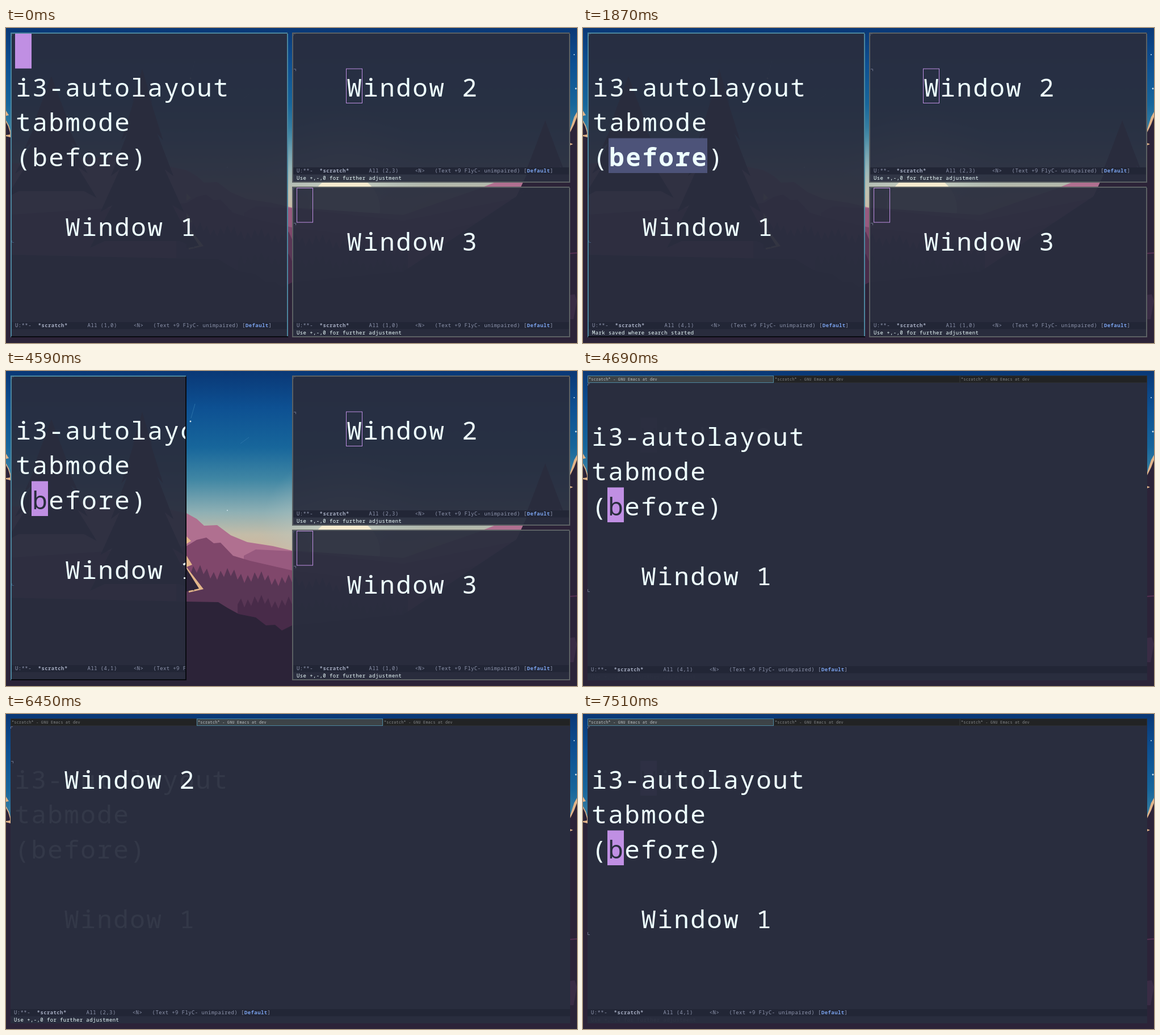
Write an HTML page that moves like this. It is 1006 px wide and 556 px high and loops after 8000 ms.

```html
<!DOCTYPE html>
<html lang="en">
<head>
<meta charset="utf-8">
<title>Tab mode</title>
<style>
  html, body { margin: 0; width: 100%; height: 100%; overflow: hidden; background: #2c2338; }
  svg { display: block; }
  text {
    font-family: "Noto Sans Mono", "DejaVu Sans Mono", monospace;
    letter-spacing: .0488em;
    white-space: pre;
    fill: #eeffff;
  }
  .big { font-size: 44.4px; letter-spacing: .0532em; }
  .small { font-size: 8.94px; }
  .tab { font-size: 6.67px; }
  .bold { font-weight: 700; }
</style>
</head>
<body>
<svg id="stage" width="1006" height="556" viewBox="0 0 1006 556">
  <defs>
    <linearGradient id="sky" x1="0" y1="0" x2="0" y2="320" gradientUnits="userSpaceOnUse">
      <stop offset="0" stop-color="#0a3876"/>
      <stop offset=".2" stop-color="#0d5092"/>
      <stop offset=".42" stop-color="#17669b"/>
      <stop offset=".6" stop-color="#4187a4"/>
      <stop offset=".78" stop-color="#8fb0b4"/>
      <stop offset=".9" stop-color="#c3bca8"/>
      <stop offset="1" stop-color="#d2b69c"/>
    </linearGradient>
    <radialGradient id="glow" cx="597" cy="290" r="150" gradientUnits="userSpaceOnUse">
      <stop offset="0" stop-color="#d8dccb" stop-opacity=".8"/>
      <stop offset="1" stop-color="#a9c3c6" stop-opacity="0"/>
    </radialGradient>
  </defs>
  <g id="wallpaper"></g>
  <g id="desktop"></g>
</svg>
<script>
const LOOP = 8000;
const COL = 29, ROW = 61.5, BASE = 49, BEARING = 1.2;
const BG = '#292d3e', PURPLE = '#c08fe3', DARK = '#2c2338', PEACH = '#e2b58a';
const HINT = 'Use +,-,0 for further adjustment';

const rect = (x, y, w, h, fill, extra = '') =>
  `<rect x="${x}" y="${y}" width="${w}" height="${h}" fill="${fill}" ${extra}/>`;
const poly = (points, fill) => `<polygon points="${points}" fill="${fill}"/>`;
const line = (d, stroke, width = 1) =>
  `<path d="${d}" fill="none" stroke="${stroke}" stroke-width="${width}"/>`;
const esc = s => s.replace(/&/g, '&amp;').replace(/</g, '&lt;');
const text = (x, y, cls, s, fill = '#eeffff') =>
  `<text x="${x}" y="${y}" class="${cls}" style="fill:${fill}">${esc(s)}</text>`;
const big = (x, y, s, bold, fill) =>
  text(x + BEARING, y + BASE, bold ? 'big bold' : 'big', s, fill);

// ---- wallpaper ----
function tree(cx, top, bottom, half) {
  const left = [], right = [];
  for (let i = 1; i <= 5; i++) {
    const y = top + (bottom - top) * i / 5, w = half * i / 5;
    left.unshift(`${cx - w * .72},${y - 12} ${cx - w},${y}`);
    right.push(`${cx + w},${y} ${cx + w * .72},${y - 12}`);
  }
  return poly(`${cx},${top} ${right.join(' ')} ${left.join(' ')}`, DARK);
}

function forest(x0, x1, y0, y1, fill) {
  let pts = `${x0},556 `;
  const n = Math.round((x1 - x0) / 6);
  for (let i = 0; i <= n; i++) {
    const y = y0 + (y1 - y0) * i / n + 5 * Math.sin(i * .7) + (i % 2 ? -7 : 7);
    pts += `${x0 + i * 6},${y} `;
  }
  return poly(pts + `${x1},556`, fill);
}

function wallpaper() {
  const stars = [[325, 89], [390, 246], [1004, 107], [1001, 47]]
    .map(([x, y], i) => `<circle cx="${x}" cy="${y}" r="${i % 2 ? 1 : 1.4}" fill="#cfe4ee"/>`).join('');
  return rect(0, 0, 1006, 556, 'url(#sky)') +
    rect(430, 140, 334, 200, 'url(#glow)') +
    '<circle cx="597" cy="320" r="62" fill="#f6ebcf"/>' +
    stars +
    line('M326 83L333 58M413 128L428 117', '#2f78ad', .8) +
    poly('0,240 200,225 318,251 336,261 349,273 372,272 396,290 425,302 470,309 504,317 700,330 830,285 860,273 930,270 994,245 994,556 0,556', '#b07090') +
    poly('419,326 440,315 504,318 700,340 900,300 900,556 419,556', '#985a7f') +
    poly('0,330 318,309 336,298 353,294 366,304 378,303 400,326 430,335 504,352 700,375 1006,300 1006,556 0,556', '#80476b') +
    forest(300, 708, 350, 392, '#593655') +
    forest(408, 708, 405, 420, '#482b49') +
    poly('0,400 318,407 374,408 390,418 410,429 440,435 458,449 474,448 486,458 504,449 700,430 940,270 1006,240 1006,556 0,556', DARK) +
    poly('318,292 326,300 318,305', PEACH) +
    poly('318,326 328,342 318,346', PEACH) +
    poly('318,346 348,385 322,391', PEACH) +
    poly('318,349 340,384 318,389', DARK) +
    tree(80, 85, 300, 80) + tree(240, 72, 388, 92) + tree(950, 163, 390, 86) +
    poly('0,146 5,154 0,155', PEACH) +
    poly('0,163 5,172 8,182 8,556 0,556', PEACH) +
    poly('0,166 4,174 7,184 7,188 0,189 0,191 8,193 8,556 0,556', DARK) +
    poly('1006,148 1001,157 994,179 994,556 1006,556', PEACH) +
    poly('1006,157 1001,170 994,184 994,203 999,205 994,207 994,556 1006,556', DARK) +
    line('M992 398L1006 397', '#573052', 2) +
    poly('994,471 1002,470 1006,482 1000,514 994,514', '#3a2c45');
}

// ---- editor windows ----
const PAGES = [
  ['', 'i3-autolayout', 'tabmode', '(before)', '', '   Window 1'],
  ['', '   Window 2'],
  ['', '   Window 3']
];
const HOME = [[3, 1], [1, 3], [0, 0]];

const page = (n, x, y) => PAGES[n].map((s, r) => {
  const lead = s.length - s.trimStart().length;
  return s ? big(x + lead * COL, y + r * ROW, s.trim()) : '';
}).join('');

function cursor(n, [r, c], x, y, bold) {
  const ch = (PAGES[n][r][c] || '').trim();
  const cx = x + c * COL, cy = y + r * ROW;
  return rect(cx, cy, COL, ROW, PURPLE) + (ch && big(cx, cy, ch, bold, BG));
}

function match(n, [r, c, len], x, y) {
  const mx = x + c * COL, my = y + r * ROW;
  return rect(mx, my, len * COL, ROW, '#4d5379') +
    big(mx, my, PAGES[n][r].slice(c, c + len), true);
}

function modeLine(x, y, w, pos, search) {
  const at = col => x + 6 + col * 5.8, base = y + 9.4, gray = '#8f96ae';
  const modes = `(Text +9 FlyC- ${search ? 'Isearch ' : ''}unimpaired) [`;
  const end = 42 + modes.length;
  return rect(x, y, w, 12.5, '#222636') +
    text(at(0), base, 'small', 'U:**-', gray) +
    text(at(7), base, 'small bold', '*scratch*', '#a6adc2') +
    text(at(22), base, 'small', `All (${pos})`, gray) +
    text(at(36), base, 'small', '<N>', gray) +
    text(at(42), base, 'small', modes, gray) +
    text(at(end), base, 'small bold', 'Default', '#7ba3ee') +
    text(at(end + 7), base, 'small', ']', gray);
}

// A tiled window; the nested svg clips its contents.
function tile(n, x, y, w, h, s) {
  const focused = n === 0, edge = focused ? '#4c859d' : '#5b6063';
  let out = rect(0, 0, w, h, BG, 'opacity=".94"') + page(n, 8, 2);
  if (s.match) out += match(n, s.match, 8, 2);
  if (s.cur) out += cursor(n, s.cur, 8, 2, s.match);
  if (!focused) {
    const [r, c] = HOME[n];
    out += rect(8.5 + c * COL, 2.5 + r * ROW, 28, 60.5, 'none', `stroke="${PURPLE}"`);
  }
  out += modeLine(2, h - 27, w - 4, s.pos, s.search) +
    text(8, h - 5, 'small', s.echo || '') +
    line('M2.5 6V2.5H6', '#3f4963') +
    (focused ? line('M2.5 367V370.5H6', '#405877') : line('M3 64.5H6.5V68', '#6b728a')) +
    line(`M1 ${h}V1H${w - 1}`, edge, 2);
  const narrow = w < 400;
  out += line(`M${w - 1} 2V${h}`, narrow ? '#080a10' : edge, 2) +
    line(`M1 ${h - 1}H${w}`, focused ? '#080a10' : edge, 2);
  return `<svg x="${x}" y="${y}" width="${w}" height="${h}">${out}</svg>`;
}

function tiled(s) {
  return tile(0, 8, 8, s.width || 489, 538, s) +
    tile(1, 504, 8, 490, 265, { pos: '2,3', echo: HINT }) +
    tile(2, 504, 280, 490, 266, { pos: '1,0', echo: HINT });
}

function tabBar(active) {
  return [8, 336, 664].map((x, i) => {
    const w = i === 2 ? 330 : 328, on = i === active;
    return rect(x + .5, 8.5, w - 1, 12, on ? '#3d4347' : '#222324',
        `stroke="${on ? '#4c859d' : '#2c2e30'}"`) +
      text(x + 2, 17.3, 'tab', '*scratch* - GNU Emacs at dev', on ? '#c0c4c6' : '#85888a');
  }).join('');
}

// The page left behind stays faintly visible under the new one.
function ghostPage([n, alpha], x, y) {
  const extra = n ? cursor(n, HOME[n], x, y) + text(x, 543, 'small', HINT) : '';
  return `<g opacity="${alpha}">${page(n, x, y)}${extra}</g>`;
}

function tabbed(s) {
  const n = s.tab, x = 14, y = 21;
  let out = rect(8, 20, 986, 526, BG);
  if (s.ghost) out += ghostPage(s.ghost, x, y);
  out += page(n, x, y);
  if (s.cur) out += cursor(n, HOME[n], x, y);
  out += modeLine(8, 521, s.width || 986, ['4,1', '2,3', '1,0'][n]) +
    text(x, 543, 'small', n ? HINT : '') +
    line('M8.5 26V22.5H12', '#6b728a') +
    (n ? line('M9 83.5H12.5V87', '#6b728a') : line('M8.5 385V389.5H12', '#6b728a'));
  return out + tabBar(n);
}

// ---- timeline ----
const WORD = 'before';
const typing = [750, 850, 1000, 1090, 1180, 1270].map((t, i) => {
  const len = i + 1, [r, c] = i ? [3, 1] : [2, 2];
  return [t, {
    pos: `${r + 1},${c + len}`, cur: [r, c + len], match: [r, c, len],
    echo: 'I-search: ' + WORD.slice(0, len), search: true
  }];
});
const found = { pos: '4,1', match: [3, 1, 6], echo: 'Mark saved where search started' };
const plain = { pos: '4,1' };
const at = [3, 1];
const first = { tab: 0, ghost: [1, .012] };
const second = { tab: 1, ghost: [0, .05] };

const STEPS = [
  [0, { pos: '1,0', cur: [0, 0] }],
  [500, { pos: '1,0', cur: [0, 0], echo: 'I-search: ', search: true }],
  ...typing,
  [1360, { ...found, cur: at }],
  [1870, found],
  [2370, { ...found, cur: at }],
  [2830, found],
  [3340, { ...plain, cur: at }],
  [3830, plain],
  [4340, { ...plain, cur: at }],
  [4590, { ...plain, cur: at, width: 310 }],
  [4640, { ...first, cur: true, width: 348 }],
  [4690, { ...first, cur: true }],
  [4780, first],
  [5340, { ...first, cur: true }],
  [5810, first],
  [5960, { ...second, cur: true }],
  [6450, second],
  [6660, { tab: 2 }],
  [6720, { tab: 2, cur: true }],
  [7210, { tab: 2 }],
  [7310, { tab: 1, cur: true }],
  [7510, { tab: 0, cur: true, ghost: [1, .035] }]
];

document.getElementById('wallpaper').innerHTML = wallpaper();
const desktop = document.getElementById('desktop');
const start = performance.now();
let shown = -1;

function draw() {
  const t = (performance.now() - start) % LOOP;
  const i = STEPS.findLastIndex(([from]) => from <= t);
  if (i !== shown) {
    const s = STEPS[i][1];
    desktop.innerHTML = 'tab' in s ? tabbed(s) : tiled(s);
    shown = i;
  }
  requestAnimationFrame(draw);
}
draw();
</script>
</body>
</html>
```
